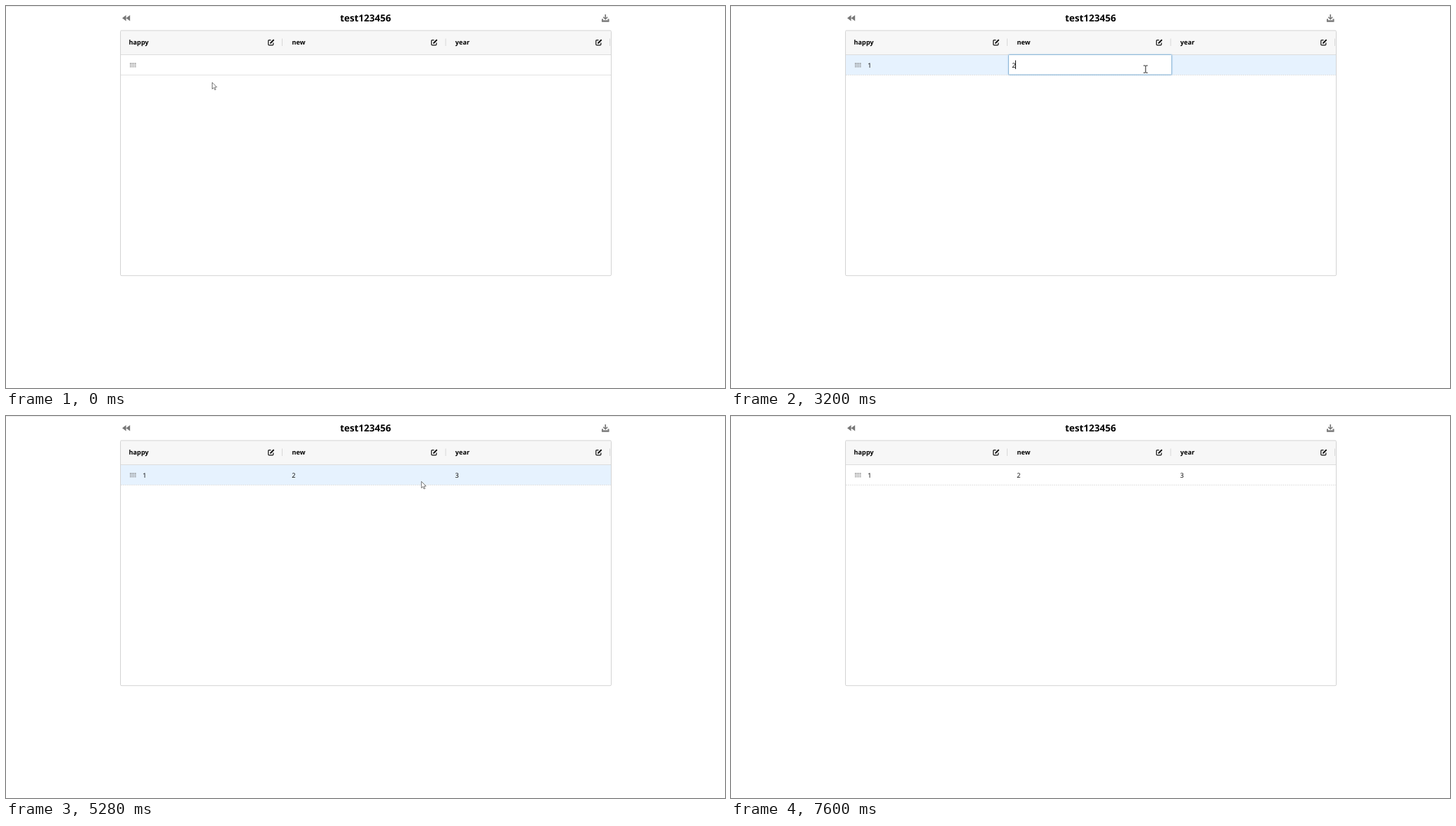
Animation, 1027 px wide and 545 px high, one loop 8560 ms. Source, as an HTML page:

```html
<!DOCTYPE html>
<html lang="en">
<head>
<meta charset="utf-8">
<title>Editable table</title>
<style>
  html, body { margin: 0; width: 100%; height: 100%; overflow: hidden; background: #fff; }
  svg { display: block; }
  text { font: 9.3px "Noto Sans", "Open Sans", sans-serif; fill: #111; text-rendering: geometricPrecision; }
  .head { font-weight: 700; font-size: 9.15px; fill: #000; }
  .title { font-weight: 700; font-size: 13.5px; fill: #000; text-anchor: middle; }
  .editor { fill: #fff; stroke: #8fb8d8; filter: drop-shadow(0 0 1.2px #7fb2dc99); }
  .focus { fill: none; stroke: #55b5c6; }
</style>
</head>
<body>
<svg width="1027" height="545" viewBox="0 0 1027 545">
  <defs>
    <g id="edit">
      <path d="M4.4 1.5H1.8Q.7 1.5 .7 2.6V7.5Q.7 8.6 1.8 8.6H6.7Q7.8 8.6 7.8 7.5V5.4" fill="none" stroke="#111" stroke-width="1.2"/>
      <path d="M2.9 6.6L3.3 4.7L7.3 .7Q8 .1 8.7 .7Q9.4 1.4 8.8 2.1L4.8 6.2Z" fill="#111"/>
    </g>
  </defs>
  <path d="M0 .5H1027" stroke="#e9e9e9"/>
  <path d="M171.6 13V21.4L166 17.2ZM177.2 13V21.4L171.6 17.2Z" fill="#777"/>
  <text class="title" x="513.6" y="22">test123456</text>
  <g stroke="#777" fill="none">
    <path d="M856.2 12V18" stroke-width="1.7"/>
    <path d="M853.2 15.8L856.2 18.8L859.2 15.8" stroke-width="1.5"/>
    <path d="M853 19.2H851.6V22H860.8V19.2H859.4" stroke-width="1.4"/>
    <path d="M852 21.2H860.5" stroke-width="1.8"/>
  </g>
  <path d="M164 35H864V69H164Z" fill="#f7f7f7"/>
  <rect id="row" x="164" y="69.5" width="700.5" height="29" fill="#e6f2fe"/>
  <path d="M164 69.5H864" stroke="#dcdcdc"/>
  <path id="rule" d="M164 98.5H864" stroke="#e2e2e2"/>
  <g id="heads"></g>
  <rect x="163.5" y="35" width="701" height="349.7" rx="1.5" fill="none" stroke="#d3d3d3"/>
  <path id="grip" d="M177 82H186M177 84.3H186M177 86.6H186" stroke="#777" stroke-width="1.3" stroke-dasharray="1.4 1"/>
  <g id="cells"></g>
  <path id="caret" d="M0 77.5V90" stroke="#111"/>
  <path id="arrow" d="M0 0V9.4L2.2 7.4L3.7 10.7L5.2 10.1L3.7 6.8H6.7Z" fill="#fff" stroke="#555" stroke-width=".8" stroke-linejoin="round"/>
  <path id="beam" d="M-3 -5H-.8L0 -4.4L.8 -5H3M0 -4.4V4.6M-3 5.2H-.8L0 4.6L.8 5.2H3" fill="none" stroke="#222"/>
</svg>
<script>
const LOOP = 8560, STEP = 80;
const $ = id => document.getElementById(id);

// Per column: geometry, then [from, to] spans in ms
const cols = [
  { name: 'happy', x: 163.5, end: 396.5, label: 175.6, icon: 374, sep: 394.5, view: 195.2, input: 168.2,
    value: '1', typed: 1520, edit: [[720, 2240]], focus: [[480, 720]] },
  { name: 'new', x: 396.5, end: 629.5, label: 408.6, icon: 607, sep: 628, view: 408.3, input: 401.2,
    value: '2', typed: 2720, edit: [[2480, 3520]], focus: [[2240, 2480], [5440, 7520]] },
  { name: 'year', x: 629.5, end: 864, label: 641.8, icon: 842, sep: 862.5, view: 641.4, input: 634.2,
    value: '3', typed: 4480, edit: [[3920, 4800]], focus: [[3520, 3920]] }
];
const caretOff = [[1040, 1520], [2000, 2240]];
const pointerOff = [[2880, 3040], [4320, 4480], [6400, 7360], [7600, LOOP]];

// Pointer path: time, x, y
const path = [
  [0, 294.5, 109], [480, 295.5, 90], [1520, 295.5, 90], [2080, 469.5, 89], [2240, 470.5, 89.5],
  [2960, 470.5, 89.5], [3200, 592.2, 90], [3520, 669, 90], [4400, 669, 90], [4480, 663, 99],
  [4560, 657.5, 110], [4800, 655, 133], [4960, 655, 133], [5200, 630, 96], [5440, 520, 88],
  [5760, 391, 86], [5840, 181, 65], [6320, 33, 6], [7359, 33, 6], [7360, 386, 2], [7440, 381, 10],
  [7520, 380.5, 3], [LOOP, 380.5, 3]
];

const within = (spans, t) => spans.some(([a, b]) => t >= a && t < b);
const show = (el, on) => el.setAttribute('visibility', on ? 'visible' : 'hidden');
const place = (el, x, y) => el.setAttribute('transform', `translate(${x} ${y})`);

function add(parent, tag, attrs, text = '') {
  const el = document.createElementNS('http://www.w3.org/2000/svg', tag);
  for (const key in attrs) el.setAttribute(key, attrs[key]);
  el.textContent = text;
  return parent.appendChild(el);
}

for (const c of cols) {
  add($('heads'), 'text', { class: 'head', x: c.label, y: 55.3 }, c.name);
  add($('heads'), 'use', { href: '#edit', x: c.icon, y: 47.2 });
  add($('heads'), 'path', { d: `M${c.sep} 46.5V57`, stroke: '#d8d8d8' });
  const box = { x: c.x, y: 69.5, width: c.end - c.x, height: 28.5 };
  c.focusBox = add($('cells'), 'rect', { ...box, class: 'focus' });
  c.editor = add($('cells'), 'rect', { ...box, rx: 1, class: 'editor' });
  c.text = add($('cells'), 'text', { y: 87.6 }, c.value);
}

function pointerAt(t) {
  const i = Math.max(1, path.findIndex(p => p[0] >= t));
  const [t0, x0, y0] = path[i - 1], [t1, x1, y1] = path[i];
  const k = (t - t0) / (t1 - t0);
  return [x0 + (x1 - x0) * k, y0 + (y1 - y0) * k];
}

function draw(t) {
  const [x, y] = pointerAt(t);
  const inRow = y >= 69 && y < 98.5;
  const active = cols.find(c => within(c.edit, t));
  const overInput = active && inRow && x > active.x && x < active.end;
  const visible = !within(pointerOff, t);

  show($('row'), inRow && x > 163 && x < 865);
  $('rule').setAttribute('stroke-dasharray', t < 480 ? 'none' : '2 1');
  show($('grip'), active !== cols[0]);
  for (const c of cols) {
    show(c.focusBox, within(c.focus, t));
    show(c.editor, c === active);
    show(c.text, t >= c.typed);
    c.text.setAttribute('x', c === active ? c.input : c.view);
  }
  show($('caret'), active && !within(caretOff, t));
  if (active) place($('caret'), Math.floor(active.input + (t >= active.typed ? 5.4 : 0)) + .5, 0);
  show($('arrow'), visible && !overInput);
  show($('beam'), visible && overInput);
  place($('arrow'), x, y);
  place($('beam'), x, y);
}

const start = performance.now();
function tick() {
  const t = (performance.now() - start) % LOOP;
  draw(Math.floor(t / STEP) * STEP);
  requestAnimationFrame(tick);
}
tick();
</script>
</body>
</html>
```
